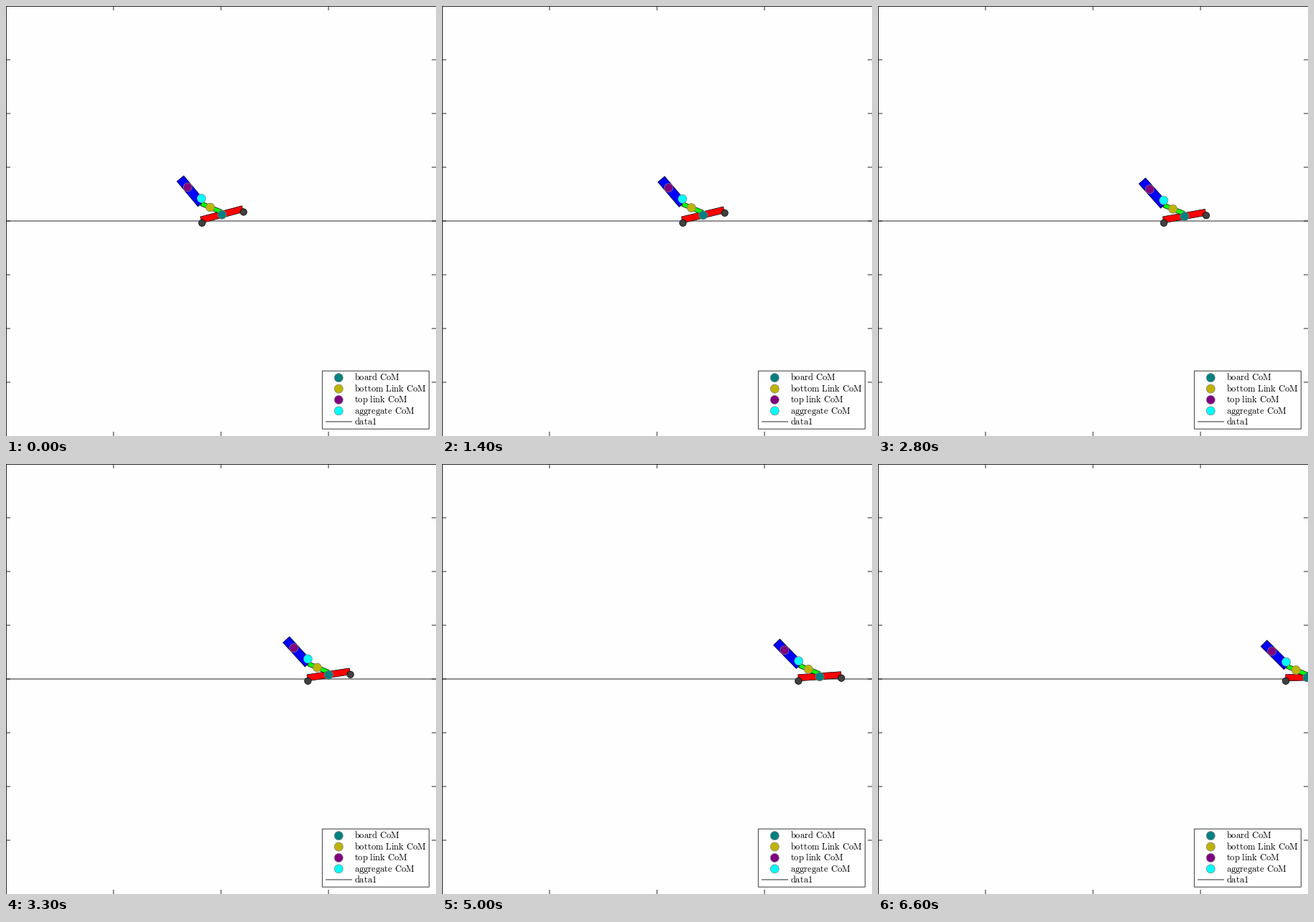
Write a matplotlib script that moves like this. It is 600x600 px and loops after 6.7 s.

```python
import numpy as np
import matplotlib.pyplot as plt
from matplotlib.animation import FuncAnimation
from matplotlib.patches import Circle, Polygon, Rectangle

FRAMES, STEP = 67, 100
SIZE, DPI = 600, 100
PX = 72 / DPI

TEAL, OLIVE, PURPLE, CYAN = "#008080", "#bfb300", "#800080", "#00ffff"
INK = "#262626"

BOARD_LEN, BOARD_H = 60, 9
LOW_LEN, LOW_W, LOW_COM = 30.2, 6, 0.555
TOP_LEN, TOP_W, TOP_COM = 45.7, 12.4, 0.655
MASS = np.array([0.351, 0.077, 0.572])

plt.rcParams["mathtext.fontset"] = "cm"
fig = plt.figure(figsize=(SIZE / DPI, SIZE / DPI), dpi=DPI, facecolor="#fefefe")
ax = fig.add_axes([0, 0, 1, 1])
ax.set_xlim(0, SIZE)
ax.set_ylim(SIZE, 0)
ax.axis("off")


def line(x0, y0, x1, y1, color=INK, width=1, z=1):
    ax.plot([x0, x1], [y0, y1], color=color, lw=width * PX, zorder=z,
            solid_capstyle="butt", snap=False)


def dot(color, r=6, edge="#808080", z=5, at=(0, 0)):
    return ax.add_patch(Circle(at, r, fc=color, ec=edge, lw=0.7 * PX, zorder=z))


def bar(color, z):
    return ax.add_patch(Polygon(np.zeros((4, 2)), fc=color, ec="black",
                                lw=0.7 * PX, zorder=z))


def unit(deg):
    """Direction on screen for an angle measured counter-clockwise."""
    a = np.radians(deg)
    return np.array([np.cos(a), -np.sin(a)])


def quad(start, end, width):
    d = (end - start) / np.hypot(*(end - start))
    n = np.array([-d[1], d[0]]) * width / 2
    return [start + n, end + n, end - n, start - n]


def draw_axes():
    line(0.5, 0, 0.5, SIZE)
    line(0, 0.5, SIZE, 0.5)
    for x in (150, 300, 450):
        line(x, 0, x, 6)
        line(x, SIZE - 6, x, SIZE)
    for y in range(75, SIZE, 75):
        line(0, y, 6, y)
        line(SIZE - 6, y, SIZE, y)
    line(0, 300, SIZE, 300)


def draw_legend():
    ax.add_patch(Rectangle((441.3, 509.2), 149, 81, fc="white", ec=INK,
                           lw=0.9 * PX, zorder=8, snap=False))
    rows = [("board CoM", TEAL), ("bottom Link CoM", OLIVE),
            ("top link CoM", PURPLE), ("aggregate CoM", CYAN), ("data1", None)]
    for i, (label, color) in enumerate(rows):
        y = 518.7 + 15.4 * i
        if color:
            dot(color, z=9, at=(464.2, y))
        else:
            line(446, y - 0.3, 483, y - 0.3, z=9)
        text = label.replace(" ", r"\ ")
        ax.text(486.5, y + 3.6, rf"$\mathrm{{{text}}}$", size=12.6 * PX,
                color="black", va="baseline", zorder=9)


draw_axes()
draw_legend()

board, top, low = bar("#ff0000", 2), bar("#0000ff", 3), bar("#00ff00", 4)
wheels = [dot("#404040", 4.7, "black") for _ in range(2)]
coms = [dot(c, z=6) for c in (TEAL, OLIVE, PURPLE, CYAN)]


def update(i):
    t = i * STEP / 1000
    tilt = 8.2 + 6.6 * np.cos(np.pi * t / 6.9)
    along, up = unit(tilt), unit(tilt + 90)

    rear = np.array([273.5, 302.8]) + [44.77 * t, 0]
    front = rear + BOARD_LEN * along
    lift = up * BOARD_H / 2
    centre = (rear + front) / 2 + up * 4
    foot = centre + up * 4
    low_dir = unit(180 - 22.5)
    top_dir = unit(180 - 44.8 - 0.4 * (tilt - 1.5))
    hip = foot + LOW_LEN * low_dir
    head = hip + TOP_LEN * top_dir

    board.set_xy(quad(rear + lift, front + lift, BOARD_H))
    low.set_xy(quad(foot, hip, LOW_W))
    top.set_xy(quad(hip, head, TOP_W))

    points = np.array([centre, foot + (hip - foot) * LOW_COM,
                       hip + (head - hip) * TOP_COM])
    for patch, p in zip(coms, [*points, MASS @ points]):
        patch.center = p
    for patch, p in zip(wheels, (rear, front)):
        patch.center = p
    return [board, top, low, *wheels, *coms]


anim = FuncAnimation(fig, update, frames=FRAMES, interval=STEP,
                     repeat=True, repeat_delay=0, blit=False)
plt.show()
```
